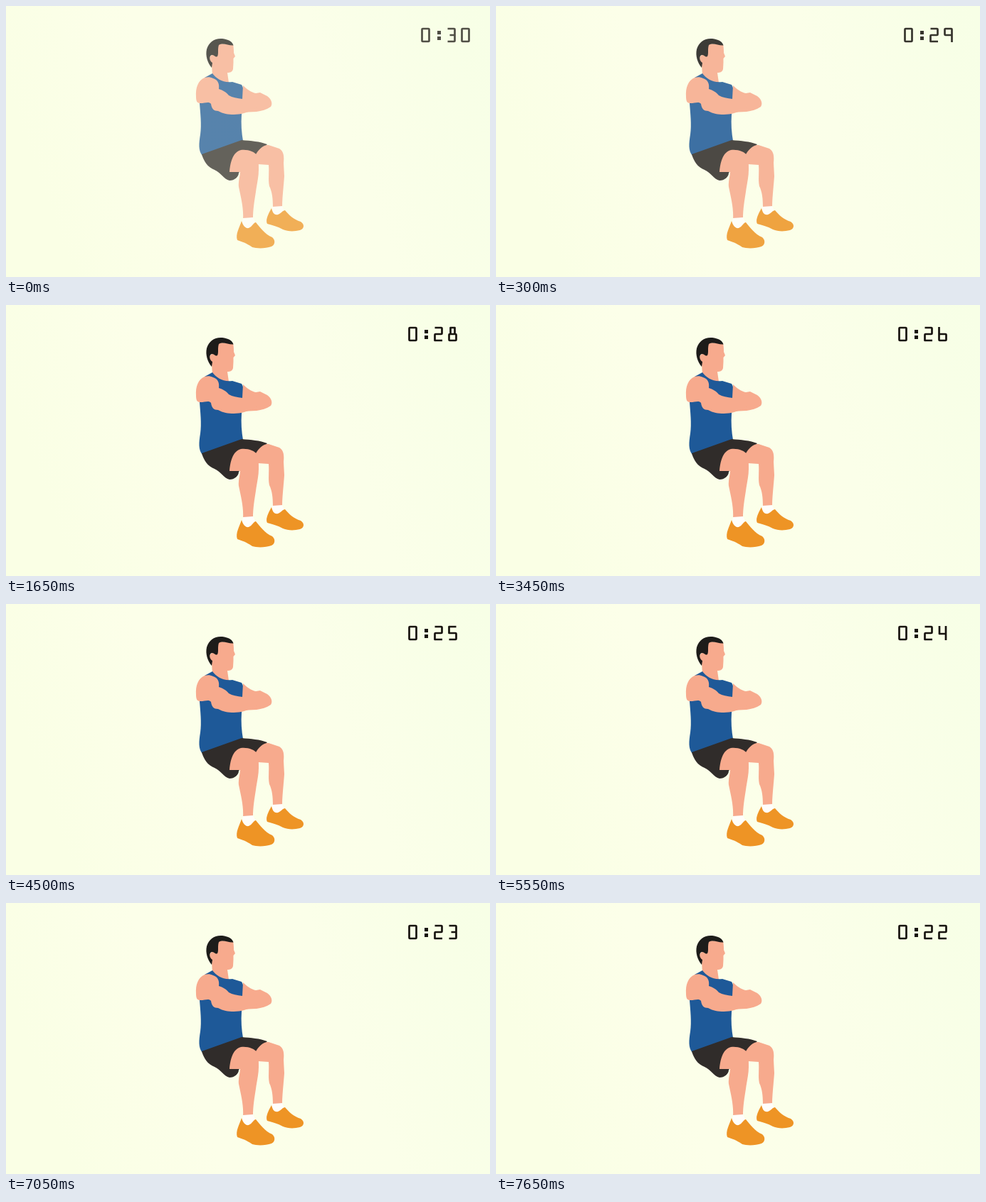
Recreate the animation shown at these times as an HTML page. Size 680 px wide and 382 px high, loop 8000 ms.

```html
<!DOCTYPE html>
<html lang="en">
<head>
<meta charset="utf-8">
<title>Wall sit countdown</title>
<style>
html, body { margin: 0; width: 100%; height: 100%; overflow: hidden; background: #fcffe9; }
svg { display: block; width: 680px; height: 382px; }
.skin { fill: #f7aa8d; }
.shirt { fill: #1e5998; }
.dark { fill: #302c2a; }
.hair { fill: #1d1c1a; }
.sock { fill: #fffefa; }
.shoe { fill: #ee9425; }
#digits { fill: none; stroke: #17130f; stroke-width: 2.7; stroke-linejoin: round; }
</style>
</head>
<body>
<svg viewBox="0 0 680 382">
  <defs>
    <linearGradient id="sky" x1="0" y1="0.3" x2="1" y2="0.1">
      <stop offset="0" stop-color="#faffe5"/>
      <stop offset="0.3" stop-color="#fcffe9"/>
      <stop offset="0.65" stop-color="#fbffe9"/>
      <stop offset="1" stop-color="#f7ffe6"/>
    </linearGradient>
  </defs>
  <rect width="680" height="382" fill="url(#sky)"/>

  <g id="man">
    <!-- head and neck -->
    <path class="skin" d="M298 53L319 54C320 59 320 63 320 66L322 71L319.500 74L319.500 80L319 89C318 93 315 94 311 94L313 108L304 109L290 99L289 82C285 78 285 70 290 69Z"/>
    <path class="hair" d="M319.500 55.500C318 50 312 47 304 46C293 45 285 51 282 61C280 70 283 80 289 87L290 80C285 77 285 69 290 69C293 69 294 73 297 71C299 67 297 61 299 55C305 51 312 56 319.500 55.500Z"/>
    <!-- shirt -->
    <path class="shirt" d="M290 95C295 102 305 109 318 107L331 111C335 117 335 127 333 137L331 153C330 166 331 179 333 190L276 211C270 204 271 194 273 181C275 167 273 151 272 137L279 101Z"/>
    <!-- shorts -->
    <path class="dark" d="M275 209L331 189C344 190 357 191 367 195L351 211L327 235C327 241 321 246 314 246C306 244 302 235 293 231C283 227 278 219 275 209Z"/>
    <!-- arms -->
    <path class="skin" d="M333 112C338 117 345 122 351 123L357 122L367 127C373 131 375 138 372 142C366 146 359 148 352 149L331 150Z"/>
    <path class="skin" d="M279 101C270 105 266 115 267 128C267 135 269 137 273 137C280 137 285 134 288 138C289 145 292 148 298 148C305 152 312 153 320 153C330 153 338 150 346 147L352 143L349 128L332 131C325 130 318 129 313 126C309 121 305 119 299 117C300 110 298 104 291 102C287 100 283 100 279 101Z"/>
    <!-- legs -->
    <path class="skin" d="M350 211C355 201 363 195 369 196L384 201C390 205 391 211 390 221L391 240C390 255 388 270 388 284L375 284C375 272 374 262 370 254C368 245 370 235 369 224L354 223Z"/>
    <path class="skin" d="M314 234C315 222 318 206 330 203C340 202 349 205 353 211C355 216 355 223 355 231C355 242 352 253 351 262C349 275 347 286 347 300L333 300C334 285 330 270 327 255C326 247 329 240 329 234Z"/>
    <!-- feet -->
    <path class="sock" d="M374 283L388 282L391 290L382 297L373 291Z"/>
    <path class="sock" d="M333 299L347 298L351 307L342 316L331 309Z"/>
    <path class="shoe" d="M373 285C375 293 378 295 382 294C387 292 389 288 392 288C397 294 404 301 414 304C420 308 419 314 413 316C405 318 396 318 389 315C382 311 374 309 367 307C364 302 369 292 373 285Z"/>
    <path class="shoe" d="M331 303C333 310 337 314 341 313C346 311 348 305 351 305C356 311 364 322 374 326C379 330 378 337 373 339C365 342 352 342 346 340C340 336 337 334 325 330C322 322 328 312 331 303Z"/>
  </g>

  <g id="clock" role="timer">
    <g id="digits"></g>
    <path fill="#17130f" d="M588 35h5v5h-5zM588 43h5v5h-5z"/>
  </g>
</svg>
<script>
const LOOP = 8000, STEP = 150, SECOND = 1050, FIRST_TICK = 300;
const ENTRY = 900, SLIDE = 18, START_ALPHA = 0.74;

// Stroke outlines in a 10 x 18 cell
const GLYPHS = {
  0: "M1 0H9Q10 0 10 1V17Q10 18 9 18H1Q0 18 0 17V1Q0 0 1 0Z",
  2: "M0 0H9Q10 0 10 1V8Q10 9 9 9H1Q0 9 0 10V18H10.500",
  3: "M0 0H9Q10 0 10 1V17Q10 18 9 18H0M3 9H10",
  4: "M.5 -1V10H10M9.500 -1V19",
  5: "M10 0H0V9H9Q10 9 10 10V17Q10 18 9 18H0",
  6: "M0 -1V17Q0 18 1 18H9Q10 18 10 17V10Q10 9 9 9H0",
  7: "M0 0H9Q10 0 10 1V19",
  8: "M2 0H8V9H2ZM1 9H9Q10 9 10 10V17Q10 18 9 18H1Q0 18 0 17V10Q0 9 1 9Z",
  9: "M10 9H1Q0 9 0 8V1Q0 0 1 0H9Q10 0 10 1V19"
};
const CELLS = [566.5, 602.5, 622.5];

const man = document.getElementById("man");
const clock = document.getElementById("clock");
const digits = document.getElementById("digits");
const cells = CELLS.map(x => {
  const path = document.createElementNS("http://www.w3.org/2000/svg", "path");
  path.setAttribute("transform", `translate(${x} 32)`);
  return digits.appendChild(path);
});

let shown = null;
function setTime(seconds) {
  if (seconds === shown) return;
  shown = seconds;
  [..."0" + seconds].forEach((d, i) => cells[i].setAttribute("d", GLYPHS[d]));
  clock.setAttribute("aria-label", "0:" + seconds);
}

function draw(now) {
  const t = Math.floor((now % LOOP) / STEP) * STEP;
  const left = 1 - Math.min(t / ENTRY, 1);
  const alpha = 1 - (1 - START_ALPHA) * left ** 1.5;
  man.setAttribute("opacity", alpha);
  clock.setAttribute("opacity", alpha);
  clock.setAttribute("transform", `translate(${SLIDE * left ** 2} 0)`);
  setTime(t < FIRST_TICK ? 30 : 29 - Math.floor((t - FIRST_TICK) / SECOND));
}

function tick() {
  draw(performance.now());
  requestAnimationFrame(tick);
}
tick();
</script>
</body>
</html>
```
